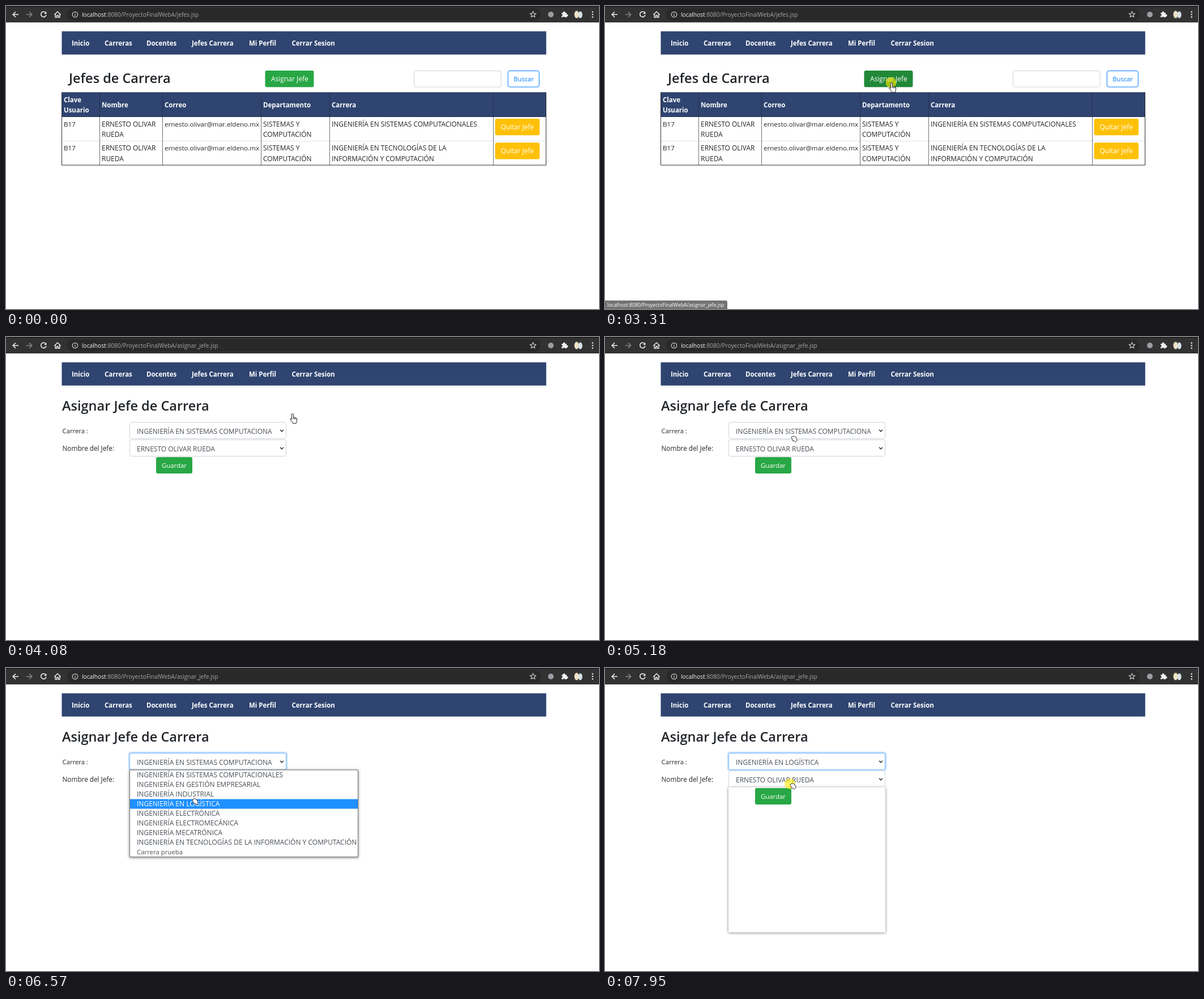
Recreate the animation shown at these times as an HTML page. Size 1047 by 535 pixels, loop 8000 ms.

```html
<!DOCTYPE html>
<html lang="es">
<head>
<meta charset="utf-8">
<title>Jefes de Carrera</title>
<style>
html, body { margin: 0; width: 100%; height: 100%; overflow: hidden; background: #fff; }
svg { display: block; width: 100%; height: 100%; }
text { font-family: "Open Sans", "Noto Sans", sans-serif; white-space: pre; }
</style>
</head>
<body>
<svg id="stage" viewBox="0 0 1047 535" preserveAspectRatio="none"></svg>
<script>
const LOOP = 8000;
const NAVY = '#2f4470', INK = '#212529', GREEN = '#28a745';
const HOST = 'localhost', DIR = ':8080/ProyectoFinalWebA/';
const PERSON = ['ERNESTO OLIVAR', 'RUEDA'];
const MAIL = 'ernesto.olivar@mar.eldeno.mx';
const COURSES = [
  'INGENIERÍA EN SISTEMAS COMPUTACIONALES',
  'INGENIERÍA EN GESTIÓN EMPRESARIAL',
  'INGENIERÍA INDUSTRIAL',
  'INGENIERÍA EN LOGÍSTICA',
  'INGENIERÍA ELECTRÓNICA',
  'INGENIERÍA ELECTROMECÁNICA',
  'INGENIERÍA MECATRÓNICA',
  'INGENIERÍA EN TECNOLOGÍAS DE LA INFORMACIÓN Y COMPUTACIÓN',
  'Carrera prueba'
];

const text = (x, y, s, size = 11.95, fill = INK, weight = 400, id = '') =>
  `<text x="${x}" y="${y}" font-size="${size}" fill="${fill}" font-weight="${weight}" id="${id}">${s}</text>`;
const bold = (x, y, s) => text(x, y, s, 11.48, '#fff', 700);
const rect = (x, y, w, h, fill, extra = '') =>
  `<rect x="${x}" y="${y}" width="${w}" height="${h}" fill="${fill}" ${extra}/>`;
const path = (d, stroke, width = 1, fill = 'none') =>
  `<path d="${d}" stroke="${stroke}" stroke-width="${width}" fill="${fill}"/>`;
const group = (id, body) => `<g id="${id}">${body}</g>`;

function toolbar() {
  const star = Array.from({ length: 10 }, (_, i) => {
    const a = i * Math.PI / 5 - Math.PI / 2, r = i % 2 ? 2.5 : 5.4;
    return (930.5 + r * Math.cos(a)).toFixed(2) + ' ' + (15 + r * Math.sin(a)).toFixed(2);
  }).join('L');
  return rect(0, 0, 1047, 29, '#323233') + rect(0, 0, 1047, 1.2, '#111') +
    rect(108, 4, 836, 22, '#29292a', 'rx="11"') +
    path('M22 15H12.5M17 10.2L12.2 15L17 19.8', '#f1f1f1', 1.6) +
    path('M36 15H45.5M41 10.2L45.8 15L41 19.8', '#85868a', 1.5) +
    path('M70 11.6A4.7 4.7 0 1 0 71 15.8', '#f1f1f1', 1.6) +
    path('M71.4 9.8V14H67.2Z', 'none', 0, '#f1f1f1') +
    path('M85.4 15.4L91 10L96.6 15.4M87.2 14V20H89.8V16.4H92.2V20H94.8V14', '#f1f1f1', 1.4) +
    '<circle cx="122" cy="15" r="4.8" fill="none" stroke="#dadce0" stroke-width="1.1"/>' +
    path('M122 14.2V17.8M122 11.8V13.1', '#dadce0', 1.2) +
    `<text x="134" y="18.5" font-size="10.2" fill="#f5f5f5">${HOST}<tspan fill="#a3a6aa" id="url"></tspan></text>` +
    path(`M${star}Z`, '#d5d6d8', 1.1) +
    '<circle cx="962" cy="15" r="5" fill="#9b9ea2"/>' +
    path('M981 12h2.6a1.9 1.9 0 1 1 3.6 0h2.8v2.8a1.9 1.9 0 1 1 0 3.6v1.6h-3.2a1.7 1.7 0 0 0-3.2 0H981v-2.8a1.7 1.7 0 0 0 0-3.4z', 'none', 0, '#f1f1f1') +
    '<circle cx="1010.5" cy="15" r="8" fill="#3b3a38"/>' +
    '<ellipse cx="1007.5" cy="15" rx="4" ry="6.5" fill="#efe3c4"/>' +
    '<ellipse cx="1014" cy="15.5" rx="3.6" ry="6" fill="#d6e2e8"/>' +
    [10.5, 15, 19.5].map(y => `<circle cx="1035.7" cy="${y}" r="1.3" fill="#f1f1f1"/>`).join('');
}

function menu() {
  const items = [[116, 'Inicio'], [174, 'Carreras'], [248, 'Docentes'],
    [328, 'Jefes Carrera'], [429, 'Mi Perfil'], [504.5, 'Cerrar Sesion']];
  return rect(98.5, 44.7, 855.3, 41, NAVY) + items.map(([x, s]) => bold(x, 70, s)).join('');
}

function row(y, course) {
  const lines = (x, list) => list.map((s, i) => text(x, y + 18.4 * i, s)).join('');
  return text(102, y, 'B17', 11.6) + lines(169, PERSON) + text(280, y, MAIL, 11.6) +
    lines(454, ['SISTEMAS Y', 'COMPUTACIÓN']) + lines(575, course) +
    rect(863.5, y - 14, 78.7, 29.3, '#ffc107', 'rx="3"') +
    text(873.5, y + 5, 'Quitar Jefe', 11.8, '#fff');
}

function listPage() {
  const cols = [98.5, 165.5, 276.5, 450.5, 571.5, 860.5, 953.5];
  const heads = [[102, 169.7, 'Clave'], [102, 188, 'Usuario'], [169, 178.8, 'Nombre'],
    [280, 178.8, 'Correo'], [454, 178.8, 'Departamento'], [575, 178.8, 'Carrera']];
  return text(111, 135.5, 'Jefes de Carrera', 23.5, INK, 600) +
    rect(457.5, 114, 86, 29.3, GREEN, 'rx="3" id="assign"') +
    text(468, 133.2, 'Asignar Jefe', 12, '#fff') +
    rect(720.5, 114.5, 153.5, 28.5, '#fff', 'rx="3" stroke="#ced4da"') +
    rect(886.3, 114.5, 55, 28.5, '#fff', 'rx="3" stroke="#007bff"') +
    text(896.3, 133.2, 'Buscar', 11.2, '#007bff') +
    rect(98.5, 153, 855, 43, NAVY) +
    heads.map(h => bold(...h)).join('') +
    path('M99 238.5H953', '#dee2e6') +
    cols.slice(1, 6).map(x => path(`M${x} 153V196`, '#26324f') + path(`M${x} 196V281`, '#6c7076')).join('') +
    path('M98.5 153V281H953.5V153', '#2b2f33') + path('M98 195.5H954M98 152.8H954', '#253252') +
    row(213, ['INGENIERÍA EN SISTEMAS COMPUTACIONALES']) +
    row(255.3, ['INGENIERÍA EN TECNOLOGÍAS DE LA', 'INFORMACIÓN Y COMPUTACIÓN']);
}

function select(y, id, value) {
  return rect(218.5, y, 276, 29, '#fff', `rx="3" stroke="#ced4da" id="${id}Box"`) +
    text(231, y + 20.2, value, 12, '#495057', 400, id) +
    path(`M484 ${y + 13.3}l3 3l3-3`, '#343a40', 1.6);
}

function formPage() {
  return text(99, 129.5, 'Asignar Jefe de Carrera', 23.5, INK, 600) +
    text(99.5, 169.7, 'Carrera :', 11.3) + text(99.5, 200.5, 'Nombre del Jefe:', 11.75) +
    rect(217, 149, 279, 32, 'none', 'rx="4" stroke="#bfdeff" stroke-width="2.4" id="ring"') +
    select(150.5, 'course', '') + select(181.5, 'person', PERSON.join(' ')) +
    group('blank', rect(218, 210.5, 277, 256, '#fff', 'filter="url(#shadow)"')) +
    rect(265, 212, 64, 29, GREEN, 'rx="3"') + text(275, 231.2, 'Guardar', 11.4, '#fff') +
    group('drop', rect(218.5, 180, 403, 153.5, '#fff', 'stroke="#767676" filter="url(#shadow)"') +
      rect(219, 180.5, 402, 17, '#1e90ff', 'id="mark"') +
      COURSES.map((s, i) => text(231, 193.3 + 17 * i, s, i < 8 ? 12 : 11.4, '#495057', 400, 'opt' + i)).join(''));
}

const stage = document.getElementById('stage');
stage.innerHTML =
  '<defs><filter id="shadow" x="-10%" y="-10%" width="120%" height="120%">' +
  '<feDropShadow dx="0" dy="1" stdDeviation="2.8" flood-color="#000" flood-opacity=".5"/></filter></defs>' +
  rect(0, 0, 1047, 535, '#fff') + toolbar() + menu() +
  group('list', listPage()) + group('form', formPage()) +
  group('status', path('M0 520H213q3 0 3 3V535H0Z', 'none', 0, '#737373') +
    text(4, 531, HOST + DIR + 'asignar_jefe.jsp', 8.74, '#fff')) +
  '<circle id="click" r="9.5" fill="#ffeb00" opacity=".6"/>' +
  group('hand', path('M3.4 10.5V2a1.5 1.5 0 0 1 3 0v5l4.7 1.1q1.9.5 1.7 2.5l-.8 4.2-.6 2.6H5.3l-.9-2.4-3.5-4.5q-.5-1.5 1-1.6zM6.4 7v3M8.7 7.7v2.5M10.9 8.2v2.2', '#222', 1, '#fff')) +
  group('mitt', path('M.8 2.6L4.8.6L9 2.4L9.8 5.2L11.4 8.3L8.3 11L6 9.2L3 9L2.4 5.6Z', '#1a1a1a', .9, '#fff') +
    path('M4.8 4L6.4 5.4', '#555', .6));

const el = {};
stage.querySelectorAll('[id]').forEach(n => { if (n.id) el[n.id] = n; });

// start, end, number of steps, destination of the pointer
const MOVES = [
  [450, 525, 2, 1037, 527], [600, 600, 1, 1060, 540],
  [1000, 1600, 8, 448, 200], [1680, 1760, 3, 476, 158],
  [1840, 2080, 4, 484, 145], [2300, 2300, 1, 492, 145],
  [2380, 2550, 3, 499, 140], [3010, 3160, 3, 501, 135],
  [4150, 4720, 9, 373, 185], [4780, 5000, 4, 340, 172],
  [5080, 5250, 3, 324, 175], [5950, 5950, 1, 323, 176],
  [6020, 6570, 8, 328, 230], [6650, 6720, 2, 330, 239],
  [6790, 6790, 1, 330.5, 240], [7400, 7800, 6, 326, 203]
];
const CLICKS = [[3310, 3460], [5410, 5540], [7190, 7340], [7880, 8000]];

function pointer(t) {
  let x = 1060, y = 540;
  for (const [from, to, n, tx, ty] of MOVES) {
    if (t < from) break;
    const gap = (to - from) / Math.max(1, n - 1) || 1;
    const u = Math.min(n, Math.floor((t - from) / gap + 1e-6) + 1) / n;
    const e = u * u * (3 - 2 * u);
    x += (tx - x) * e;
    y += (ty - y) * e;
  }
  return [x, y];
}

const show = (node, on) => node.setAttribute('display', on ? 'inline' : 'none');

function draw(t) {
  const [x, y] = pointer(t);
  const form = t >= 3540, hand = t >= 2380 && t < 4150;
  const open = t >= 5480 && t < 7340;
  const pick = Math.max(0, Math.floor((y + 2 - 180.5) / 17));

  show(el.list, !form);
  show(el.form, form);
  el.url.textContent = DIR + (form ? 'asignar_jefe.jsp' : 'jefes.jsp');
  el.assign.setAttribute('fill', t >= 2380 ? '#218838' : GREEN);
  show(el.status, t >= 3310 && t < 3930);

  show(el.ring, t >= 5410);
  el.courseBox.setAttribute('stroke', t >= 5410 ? '#80bdff' : '#ced4da');
  el.course.textContent = t >= 7340 ? COURSES[3] : COURSES[0].slice(0, -3);
  show(el.drop, open);
  show(el.blank, t >= 7950);
  el.mark.setAttribute('y', 180.5 + 17 * pick);
  COURSES.forEach((_, i) => {
    show(el['opt' + i], t >= 5540);
    el['opt' + i].setAttribute('fill', i === pick ? '#fff' : '#495057');
  });
  show(el.mark, t >= 5540);

  show(el.hand, hand);
  show(el.mitt, !hand);
  (hand ? el.hand : el.mitt).setAttribute('transform', `translate(${x} ${y})`);
  show(el.click, CLICKS.some(([a, b]) => t >= a && t < b));
  el.click.setAttribute('cx', x + (hand ? 4 : 0.5));
  el.click.setAttribute('cy', y + (hand ? 0 : 1.5));
}

function tick() {
  draw(performance.now() % LOOP);
  requestAnimationFrame(tick);
}
tick();
</script>
</body>
</html>
```
